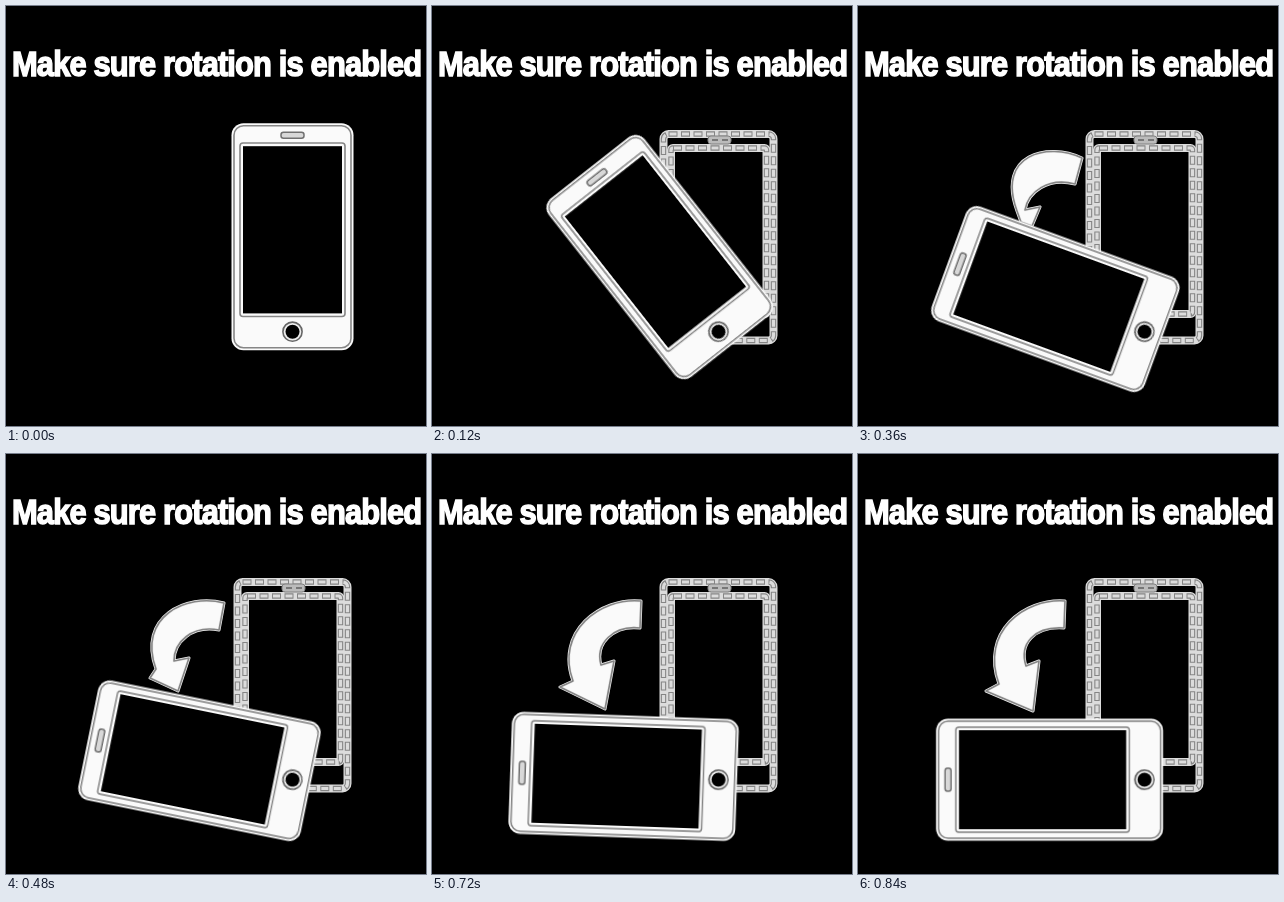
These frames come from a looping animation (420x420 px, 2.04 s). An HTML page:

```html
<!DOCTYPE html>
<html lang="en">
<head>
<meta charset="utf-8">
<title>Make sure rotation is enabled</title>
<style>
html, body { margin: 0; width: 100%; height: 100%; overflow: hidden; background: #000; }
svg { display: block; width: 100vw; height: 100vh; }

.title {
  font: 700 36px "Liberation Sans", Arial, sans-serif;
  letter-spacing: -1px;
  fill: #fff; stroke: #fff; stroke-width: 1.6;
}

/* Every part holds its pose for 120 ms, the last one for 1200 ms */
.phone, .ghost, .arrow { animation: 2040ms step-end infinite; }
.phone { transform-origin: 286.5px 325.7px; animation-name: turn; }
.ghost { animation-name: show; fill: none; }
.arrow { animation-name: grow; }

@keyframes turn {
  0% { transform: rotate(0deg); }
  5.88% { transform: rotate(-38.2deg); }
  11.76% { transform: rotate(-57.3deg); }
  17.64% { transform: rotate(-69.9deg); }
  23.52% { transform: rotate(-78.5deg); }
  29.41% { transform: rotate(-84.5deg); }
  35.29% { transform: rotate(-88deg); }
  41.17%, 100% { transform: rotate(-90deg); }
}
@keyframes show {
  0% { visibility: hidden; }
  5.88%, 100% { visibility: visible; }
}
@keyframes grow {
  0% { visibility: hidden; }
  11.76% { visibility: visible; d: path("M232 154C225 151 216 146 210 149Q202 162 203 174Q214 176 223 181Z"); }
  17.64% { visibility: visible; d: path("M224 152C190 136 138 148 159 205L163 216L174 220L182 201L167 204C170 186 190 171 217 178Z"); }
  23.52% { visibility: visible; d: path("M218 149C180 139 131 163 150 215L144 224L172 237L183 204L168 207C168 188 186 171 213 176Z"); }
  29.41% { visibility: visible; d: path("M212 147C170 142 124 178 141 224L127 230L170 252L183 205L170 209C166 190 185 170 210 174Z"); }
  35.29% { visibility: visible; d: path("M209 147C168 143 123 178 141 227L128 233L173 255L182 207L169 211C163 190 181 171 208 174Z"); }
  41.17%, 100% { visibility: visible; d: path("M207 147C166 144 122 178 141 230L128 237L175 257L181 207L168 212C161 190 176 172 206 174Z"); }
}

.ghost .band { stroke: #dcdcdc; stroke-width: 8; }
.ghost .link { stroke: #858585; stroke-width: 5.4; stroke-dasharray: 9 3.5; }
.ghost .core { stroke: #dcdcdc; stroke-width: 3.2; stroke-dasharray: 7 5.5; stroke-dashoffset: -1; }
.edge { fill: none; stroke: #868686; stroke-width: 1.6; }
</style>
</head>
<body>
<svg viewBox="0 0 420 420">
  <defs>
    <g id="rims">
      <rect x="231.5" y="128" width="110" height="206.5" rx="5"/>
      <rect x="239" y="142" width="95.5" height="166" rx="2"/>
    </g>
  </defs>

  <text class="title" transform="translate(6 69.6) scale(.858 1)">Make sure rotation is enabled</text>

  <g class="ghost">
    <use href="#rims" class="band"/>
    <use href="#rims" class="link"/>
    <use href="#rims" class="core"/>
    <rect x="276" y="130" width="23" height="8" rx="3" fill="#bbb" stroke="#808080"/>
    <path d="M280 134H296" stroke="#777" stroke-width="2" stroke-dasharray="6 4"/>
  </g>

  <path class="arrow" fill="#fafafa" stroke="#eee" stroke-width="3" stroke-linejoin="round"/>
  <path class="arrow edge" stroke-linejoin="round"/>

  <g class="phone">
    <rect x="225.5" y="117.2" width="122" height="227" rx="12" fill="#fafafa"/>
    <rect class="edge" x="228" y="119.7" width="117" height="222" rx="9.5"/>
    <rect class="edge" x="234" y="137" width="105" height="173.5" rx="3"/>
    <rect x="237" y="140.2" width="99" height="167.2"/>
    <rect x="275" y="126.2" width="23" height="6" rx="2.5" fill="#d8d8d8" stroke="#707070" stroke-width="1.5"/>
    <circle cx="286.5" cy="325.7" r="9.6" fill="#eee" stroke="#666" stroke-width="1.6"/>
    <circle cx="286.5" cy="325.7" r="7"/>
  </g>
</svg>
</body>
</html>
```
